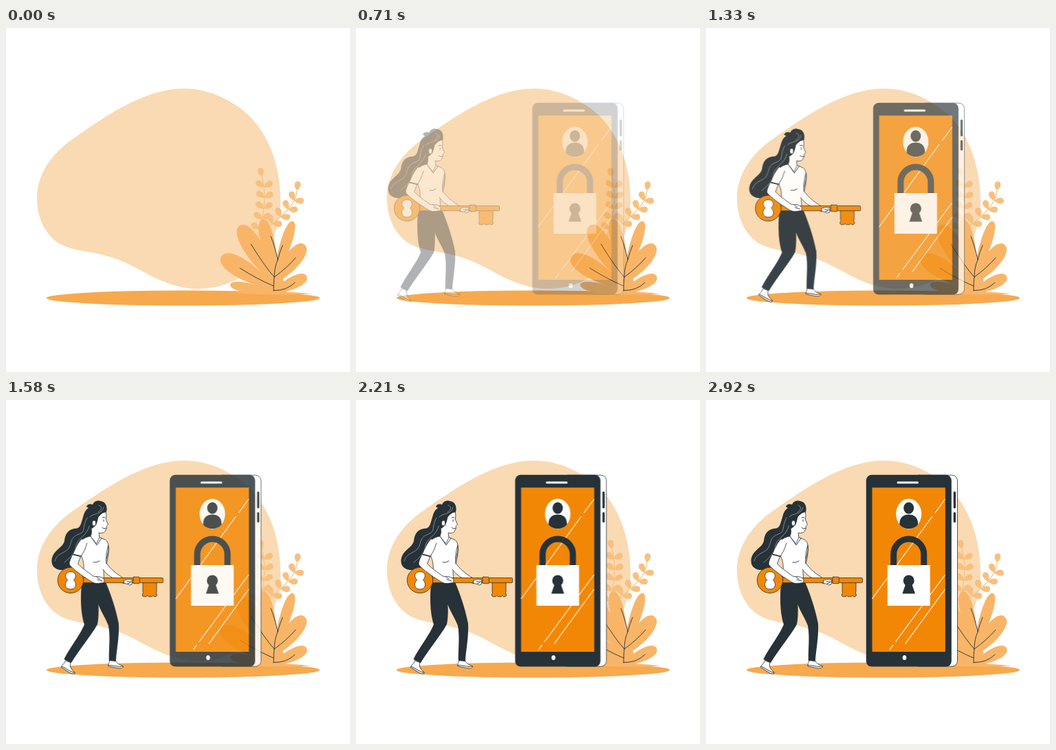
An HTML page that plays this animation: 500 by 500 pixels, repeating every 2.96 s.

```html
<!DOCTYPE html>
<html lang="en">
<head>
<meta charset="utf-8">
<title>Key and phone</title>
<style>
  html, body { margin: 0; width: 100%; height: 100%; overflow: hidden; background: #fff; }
  svg { display: block; width: 100%; height: 100%; }
  .dark { fill: #263238; }
  .white { fill: #fff; }
  .orange { fill: #f28705; }
  .line { fill: none; stroke: #263238; stroke-width: .9; stroke-linecap: round; stroke-linejoin: round; }
  .edge { stroke: #263238; stroke-width: .8; stroke-linejoin: round; stroke-linecap: round; }
  .shine { fill: none; stroke: #fff; stroke-width: 1.1; }
  .strand { fill: none; stroke: #a9afb2; stroke-width: .7; stroke-linecap: round; }
  .stem { fill: none; stroke: #f8c07f; stroke-width: 1.2; }
  #phone, #woman { opacity: 0; }
</style>
</head>
<body>
<svg viewBox="0 0 500 500">
  <defs>
    <g id="shoe">
      <path class="white edge" d="M2 -11C2 -5 -1 -3 0 0L10 2C16 3.5 22 3 21.5 0C17 -2.5 11 -3 10 -11Z"/>
      <path class="line" d="M0 -1.5C7 -1.5 14 1.5 21 0"/>
    </g>
  </defs>

  <path fill="#fadab3" d="M258 88C295 88 327 104 352 126C385 158 399 205 399 252C399 315 355 379 279 379C228 379 196 347 156 334C118 322 90 325 70 308C52 292 45 269 45 247C45 215 64 186 92 165C140 131 200 88 258 88Z"/>
  <ellipse cx="257.5" cy="392.5" rx="198.5" ry="11" fill="#f7a94e"/>
  <g id="ferns" fill="#f8c07f"></g>
  <g id="bush" fill="#f9b567">
    <path d="M354 386L372 354L402 362L408 386Z"/>
    <path d="M328 385Q388 380 444 386.5Q388 389 328 385Z"/>
  </g>
  <path class="line" d="M389 382Q389 368 390 362Q390 348 395 337Q398 325 402 316M395 337Q391 318 385 303M390 362Q377 348 356 314M390 362Q408 349 421 334M389 375Q365 365 340 349M389 381.5Q408 382 420 370"/>

  <g id="phone">
    <rect class="white edge" x="301.5" y="109.2" width="64" height="278" rx="8"/>
    <rect class="dark" x="232.8" y="108.8" width="124" height="278.7" rx="8"/>
    <rect class="dark" x="359.7" y="133" width="3.3" height="24.5" rx="1.5"/>
    <rect class="dark" x="359.7" y="163" width="3.3" height="15" rx="1.5"/>
    <rect class="orange" x="241.5" y="127.3" width="106.3" height="238.7"/>
    <rect class="white" x="277.5" y="118.5" width="31.5" height="3" rx="1.5"/>
    <ellipse class="white" cx="288.5" cy="374.5" rx="2.8" ry="3.5"/>
    <path class="shine" d="M347.5 144L333 164M329 169L241.5 289M347.5 254L275.5 351.5M272 356L267 363M347.500 275L289.5 354.5"/>
    <g transform="translate(294.7)">
      <ellipse class="white" cy="165.5" rx="18.5" ry="22"/>
      <path class="dark" d="M-13.3 181C-14 171 -8 166.5 0 166.5S14 171 13.300 181C7 189 -7 189 -13.3 181Z"/>
      <ellipse class="dark" cy="157" rx="7.5" ry="8.6"/>
      <path fill="none" stroke="#263238" stroke-width="9" d="M-22 242V224A22 22 0 0 1 22 224V242"/>
      <rect class="white" x="-31" y="240" width="62" height="59"/>
      <circle class="dark" cy="262.5" r="8"/>
      <path class="dark" d="M-4 266H4L9.300 281.5H-9.3Z"/>
    </g>
  </g>

  <g id="woman">
    <path class="dark" d="M145 163C147 155 144 148 137 147C132 145 127 147 125 152C121 150 117 152 116 155L119 157C112 161 112 169 109 177C107 184 105 187 98 187C88 189 85 196 84 205C81 216 67 218 65.5 233C65 243 73 248 84 247C95 246 101 237 103 226C107 213 121 205 124 193L133 180Z"/>
    <path class="strand" d="M117 171C109 186 116 191 105 195C91 200 96 208 89 217C83 223 73 223 70 234M121 181C117 198 104 200 101 211C99 224 91 230 84 236"/>

    <use href="#shoe" transform="translate(79.5 388.5) rotate(22)"/>
    <use href="#shoe" transform="translate(148 387)"/>
    <path class="dark" d="M110 260H142C150 278 158 300 163 325C164 344 160 362 158.8 380L148.8 379C148.5 360 151 345 148 328C144 317 136 306 133.5 297C134 310 133.5 318 132 326C124 341 106 362 94 382L83.5 377C91 361 108 340 113 326C107 309 107 280 110 260Z"/>

    <path class="white edge" d="M122 198C115 199 110 202 107 207L109 228C114 238 112 250 111 263L142.5 265C141 254 140 246 143 238L148.5 217C148 209 147 205 143 203L134 199Z"/>
    <path class="white edge" d="M148 211C145 219 144 231 145 237C151 246 160 253 170 259L175 264L171 267C160 262 146 256 140 246"/>
    <path class="line" d="M122 198L131 211L138 201M126 236Q131 237 135 234M148 213Q149 224 145 238"/>

    <path class="white edge" d="M122 181C124 189 124 194 122 198L130.5 209L135 200L134 193C139 194 143 193 144 189L145.5 186L145 183.5L147.5 181L144.5 174Q145.500 167 144 160L128 164Z"/>
    <path class="dark" d="M144.5 163C139 164 136 167 133.5 170Q132 177 130 182L124 187L119 181L120 165L129 153H144Z"/>
    <path class="strand" d="M121 170C126 164 139 167 141 156M134 153C140 155 138 160 133 163"/>
    <ellipse class="white edge" cx="127" cy="179" rx="2.6" ry="4"/>
    <path class="line" d="M141 174V176.5M139 171Q141 169.5 143 171M139 185.5Q141 188 144.5 186.5"/>

    <g class="orange edge">
      <path d="M198 265V278Q199.5 280.500 197.5 282Q196.5 285 199 285.8H203Q204.5 283 206.5 285.8H211Q213 283 214.5 285.8H217Q219.5 284 218 282Q216.5 280 218 278V265Z"/>
      <rect x="109" y="258.5" width="118.5" height="7.2" rx="1.5"/>
      <rect x="184" y="257.2" width="9.2" height="9.5" rx="1"/>
      <circle cx="93" cy="262" r="18.7"/>
      <path class="white" d="M88.5 261.5C83 256 86 249.5 93 249.5S103 256 97.5 261.5C103 267 101 275 93 275S83 267 88.5 261.5Z"/>
    </g>

    <path class="white edge" d="M97 222C94 229 90 236 91.5 239.5C95 245 113 258 126 265.5C131 267.5 136 266 141.5 265.500L142 261Q141 259 137.5 257.5C132 255.5 130 257.5 126 256C118 250 109 244 103.5 238L109 224Z"/>
    <path class="line" d="M132 261L139 263M131 257.5L135 260"/>
    <path class="white edge" d="M109 202C104 207 99 217 96.5 224.5L108 227.5Q114 219 117 208"/>
    <path class="line" style="stroke-width:1.6" d="M97 224.5L107.5 227"/>
    <path class="white edge" d="M171 262Q177 259.5 183 261.5L182 268Q178 270 176 267.5L171 266.5Z"/>
    <path class="line" d="M175 264L182 264M176 267L180 265.5"/>
  </g>
</svg>
<script>
  const get = id => document.getElementById(id);

  function addPath(parent, d, transform = '') {
    const path = document.createElementNS('http://www.w3.org/2000/svg', 'path');
    path.setAttribute('d', d);
    path.setAttribute('transform', transform);
    parent.append(path);
    return path;
  }

  // Rounded leaf from its base, widest towards the tip
  function leaf(parent, x, y, degrees, length, half) {
    const w = half / .865;
    const d = `M0 0C${length * .3} ${-w} ${length} ${-w * 1.3} ${length} 0` +
      `C${length} ${w * 1.3} ${length * .3} ${w} 0 0Z`;
    addPath(parent, d, `translate(${x} ${y}) rotate(${degrees})`);
  }

  const heading = (dx, dy) => Math.atan2(dy, dx) * 180 / Math.PI;

  // Pairs of leaves at even steps down the stem, one more on its end
  function fern(d, pairs, tilt) {
    const stem = addPath(get('ferns'), d);
    stem.setAttribute('class', 'stem');
    const length = stem.getTotalLength();
    const end = stem.getPointAtLength(length);
    const below = stem.getPointAtLength(length - 3);
    leaf(get('ferns'), end.x, end.y, heading(end.x - below.x, end.y - below.y), 13, 4.4);
    for (let i = 1; i <= pairs; i++) {
      const { x, y } = stem.getPointAtLength(length - 15.5 * i);
      for (const side of [-57, 57]) leaf(get('ferns'), x, y, tilt + side, 14, 4.4);
    }
  }

  function bushLeaf(x, y, tipX, tipY, half) {
    const dx = tipX - x, dy = tipY - y;
    leaf(get('bush'), x, y, heading(dx, dy), Math.hypot(dx, dy), half);
  }

  fern('M364 306C372 282 381 250 372 216', 5, -86);
  fern('M365 305C382 284 421 266 423 236', 4, -55);

  bushLeaf(391, 362, 417, 281, 8);
  bushLeaf(392, 364, 373, 278, 10);
  bushLeaf(390, 370, 340, 287, 14);
  bushLeaf(389, 378, 313, 332, 14);
  bushLeaf(388, 384, 326, 373, 7);
  bushLeaf(388, 372, 434, 315, 12);
  bushLeaf(389, 384, 437, 361, 9);

  const loop = 2960;
  const easing = 'cubic-bezier(.36, -.01, .5, 1.38)';

  function slideIn(id, from, end) {
    const rest = { opacity: 1, transform: 'translateX(0px)' };
    get(id).animate([
      { opacity: 0, transform: `translateX(${from}px)`, offset: 0, easing },
      { ...rest, offset: end },
      { ...rest, offset: 1 }
    ], { duration: loop, iterations: Infinity });
  }

  slideIn('phone', 30, .98);
  slideIn('woman', -30, .745);
</script>
</body>
</html>
```
